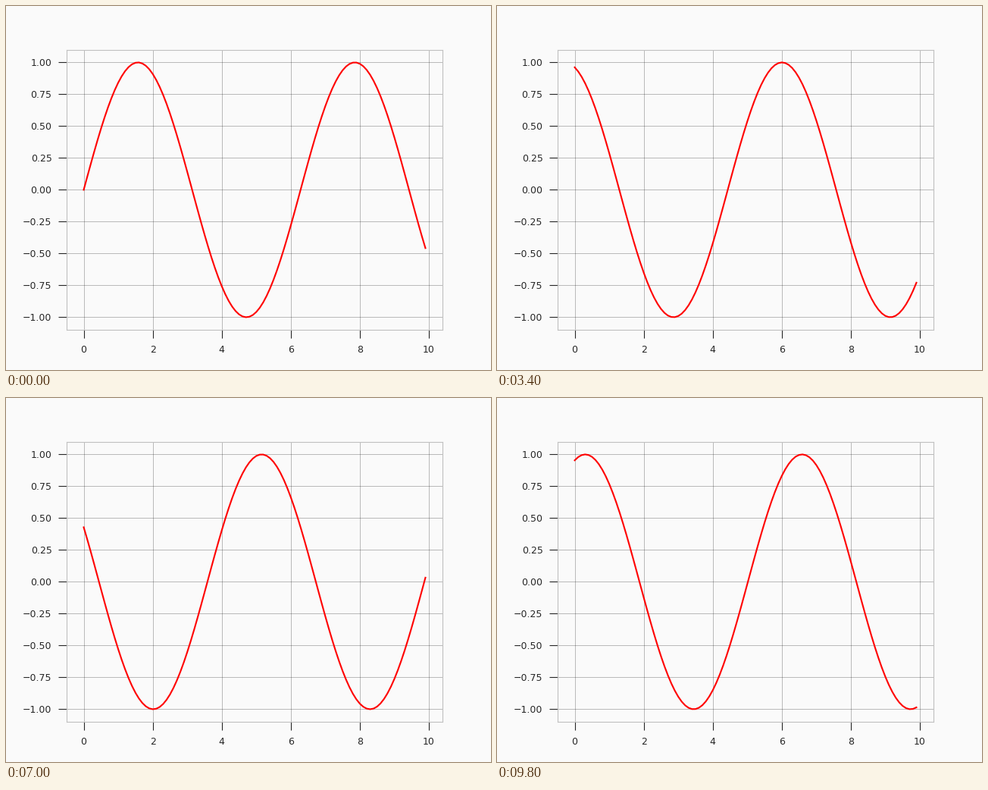
Animation of 640x480 px, one loop 10 s. Source, as a matplotlib script:

```python
import numpy as np
import matplotlib.pyplot as plt
from matplotlib.animation import FuncAnimation

FRAMES = 50
INTERVAL = 200
PAPER = "#fafafa"
INK = "#262626"

plt.rcParams["font.family"] = "DejaVu Sans"

fig, ax = plt.subplots(figsize=(6.4, 4.8), dpi=100, facecolor=PAPER)
ax.set_facecolor(PAPER)

x = np.arange(0, 10, 0.1)
line, = ax.plot(x, np.sin(x), color="red", lw=1.5)

ax.set_xlim(-0.495, 10.395)
ax.set_ylim(-1.1, 1.1)
ax.set_axisbelow(True)
ax.grid(True, color="black", alpha=0.3, lw=0.6)
ax.tick_params(length=8, width=0.8, pad=6, labelsize=9,
               color=INK, labelcolor=INK)
for spine in ax.spines.values():
    spine.set(color="#c0c0c0", linewidth=0.8)


def update(i):
    line.set_ydata(np.sin(x - i))
    return line,


anim = FuncAnimation(fig, update, frames=FRAMES, interval=INTERVAL,
                     init_func=lambda: update(0), repeat=True,
                     repeat_delay=0)
plt.show()
```
